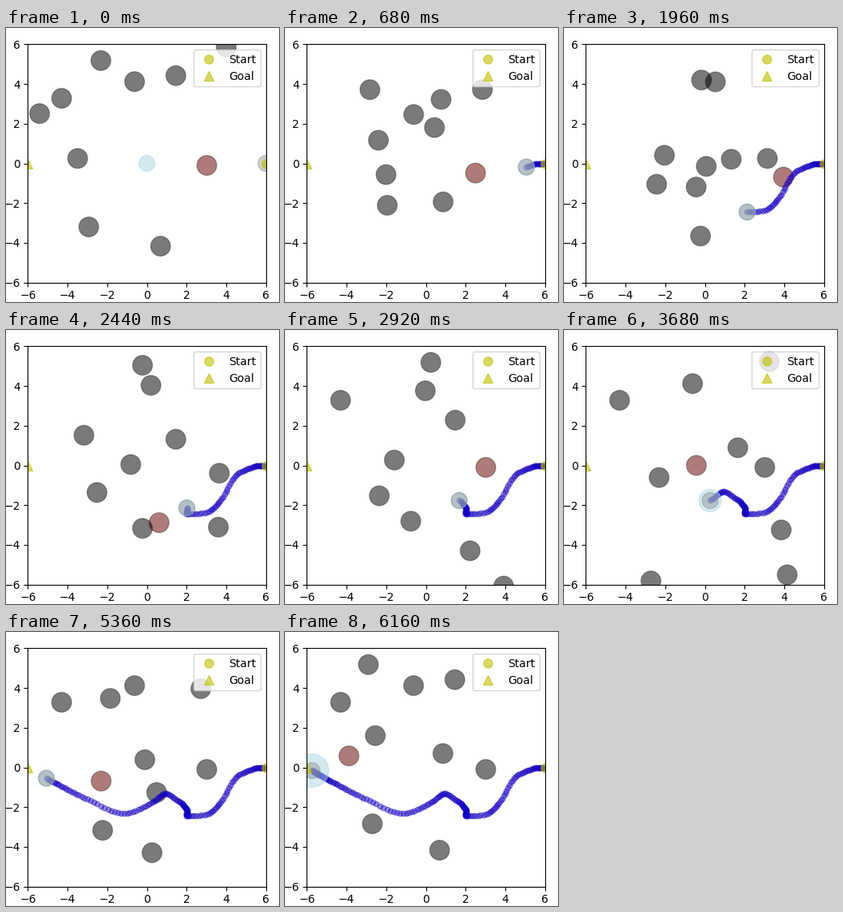
Animation, 342 px wide and 343 px high, one loop 6600 ms. Source, as a matplotlib script:

```python
import numpy as np
import matplotlib.pyplot as plt
from matplotlib.animation import FuncAnimation
from matplotlib.patches import Circle

W, H, DPI = 342, 343, 100
STEP = 40
FRAMES = 165
LAST = 154          # motion stops here, the rest is a pause
steps = np.arange(LAST + 1)


def glide(keys, points):
    """Smooth path through complex points, one position per step."""
    keys, p = np.array(keys, float), np.array(points)
    slope = np.gradient(p, keys)
    i = np.clip(np.searchsorted(keys, steps, side="right") - 1, 0, len(keys) - 2)
    h = keys[i + 1] - keys[i]
    s = (steps - keys[i]) / h
    ease = s * s * (3 - 2 * s)
    return (p[i] + ease * (p[i + 1] - p[i])
            + s * (1 - s) * h * ((1 - s) * slope[i] - s * slope[i + 1]))


# Every obstacle visits one point per beat; a short route then goes home and rests
BEATS = [0, 33, 49, 73, 92, 115, LAST]
ROUTES = [
    [3.02-.1j, 2.57-.73j, 3.96-.69j],
    [-4.3+3.28j, -1.89+3.18j, -2.04+.41j],
    [-.62+4.12j, 1.42+2.97j, .53+4.11j, -.03+3.76j],
    [.69-4.17j, .66-.63j, -.44-1.19j, 2.23-4.3j, 3.85-3.25j],
    [1.46+4.42j, -.23+1.02j, -.17+4.2j, .25+5.19j, 3.25+5.23j, 3.52+3.95j],
    [-2.93-3.2j, -1.05-1.91j, -.22-3.66j, -.76-2.81j, -2.72-5.82j, -2.06-3.85j, -2.7-2.84j],
    [-2.32+5.18j, .7+.56j, 1.33+.21j, 1.48+2.28j, 1.66+.89j, -.6+2.04j, -2.9+5.18j],
    [-3.49+.25j, -1.35-1.09j, -2.43-1.05j, -2.35-1.53j, -2.31-.61j, -1.43-1.38j, -3.88+.58j],
    [-5.41+2.51j, -.29+.18j, .07-.15j, -1.59+.27j, -.43+0j, 1.2-.36j, -2.55+1.6j],
    [4+5.87j, 2.33+1.83j, 3.15+.25j, 3.92-6.08j, 4.15-5.51j, .97-3.15j, .86+.7j],
]
obst = np.array([glide(BEATS, r + r[:1] * (len(BEATS) - len(r))) for r in ROUTES])

robot = glide(
    [0, 14, 24, 33, 41, 49, 60, 73, 83, 92, 104, 115, 130, LAST],
    [6, 5.3-.1j, 4.45-.55j, 3.76-1.68j, 3.15-2.3j, 2.13-2.45j, 2.03-2.17j,
     1.68-1.77j, .92-1.32j, .26-1.77j, -1.3-2.3j, -3.15-1.53j, -4.79-.69j,
     -5.74-.16j])
nearest = np.abs(obst - robot).argmin(axis=0)


def pulse(centre):
    return np.exp(-((steps - centre) / 6) ** 2 / 2)


halo_r = .4 + .44 * (pulse(33) + pulse(LAST)) + .16 * pulse(92)

fig = plt.figure(figsize=(W / DPI, H / DPI), dpi=DPI)
ax = fig.add_axes([27.4 / W, 24.4 / H, 298.2 / W, 298.2 / H])
ax.set(xlim=(-6, 6), ylim=(-6, 6),
       xticks=range(-6, 7, 2), yticks=range(-6, 7, 2))

for x, style, name in ((6, "yo", "Start"), (-6, "y^", "Goal")):
    ax.plot(x, 0, style, ms=8, alpha=.6, ls="none", label=name, zorder=2.5)
ax.legend(loc="upper right")

GREY = (0, 0, 0, .52)
RED = (.4, 0, 0, .52)
BODY = (.5, .5, .5, .38)
discs = [ax.add_patch(Circle((0, 0), .5, fc=GREY, ec=(0, 0, 0, .3), lw=1))
         for _ in ROUTES]
trail = ax.scatter([], [], s=22, color="#1400c0", alpha=.42, lw=1, zorder=2.1)
halo = ax.add_patch(Circle((0, 0), .4, fc="lightblue", ec="lightblue",
                           alpha=.52, lw=1, zorder=2.2))
body = ax.add_patch(Circle((6, 0), .4, fc=BODY, ec=BODY, lw=1, zorder=2.3))


def draw(frame):
    n = min(frame, LAST)
    for k, disc in enumerate(discs):
        p = obst[k, n]
        disc.center = p.real, p.imag
        disc.set_facecolor(RED if k == nearest[n] else GREY)
    here = robot[n].real, robot[n].imag
    body.center = here
    halo.center = here if n else (0, 0)
    halo.set_radius(halo_r[n])
    done = robot[1:n + 1]
    trail.set_offsets(np.column_stack([done.real, done.imag]))
    return discs + [trail, halo, body]


anim = FuncAnimation(fig, draw, frames=FRAMES, interval=STEP,
                     repeat=True, repeat_delay=0)
plt.show()
```
